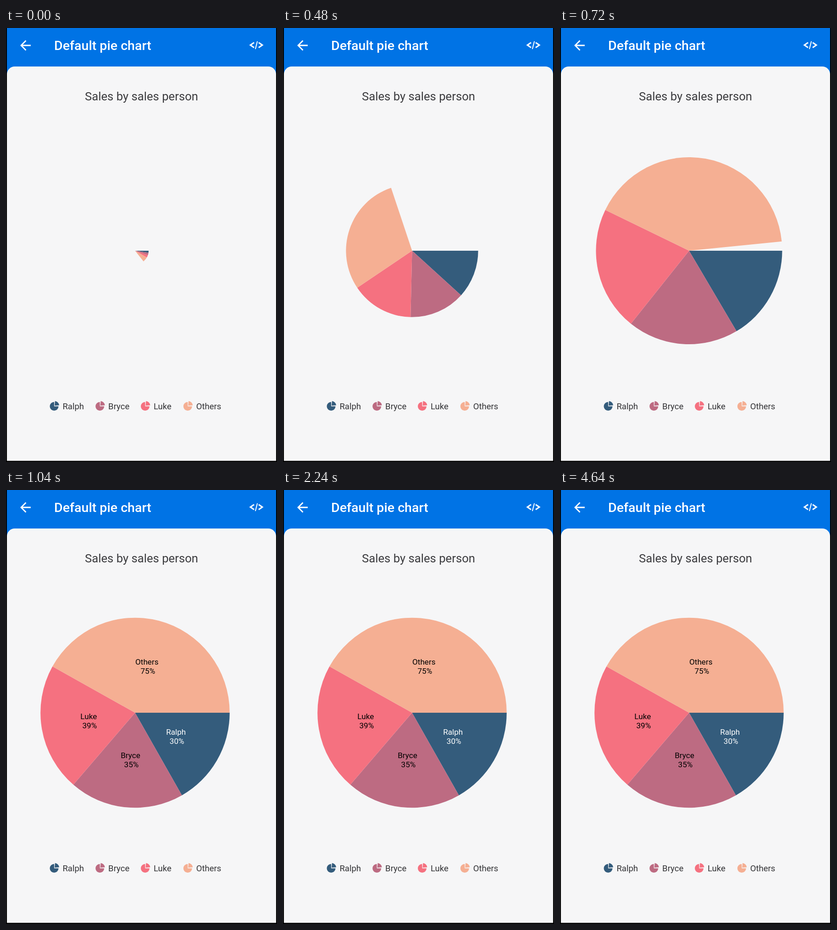
An HTML page that plays this animation: 591 by 947 pixels, repeating every 4800 ms.

```html
<!DOCTYPE html>
<html lang="en">
<head>
<meta charset="utf-8">
<title>Default pie chart</title>
<style>
html, body { margin: 0; width: 100%; height: 100%; overflow: hidden; background: #000; }
svg { display: block; width: 591px; height: 947px; font-family: Roboto, sans-serif; }
</style>
</head>
<body>
<svg viewBox="0 0 591 947">
  <rect width="591" height="947" fill="#000"/>
  <rect x="2" width="587" height="120" fill="#0073e5"/>
  <path d="M2 944.5V101a17 17 0 0 1 17-17H572a17 17 0 0 1 17 17V944.5Z" fill="#f6f6f7"/>
  <path transform="translate(25.3 20.8) scale(1.43)" fill="#fff"
    d="M20 11H7.83l5.59-5.59L12 4l-8 8 8 8 1.41-1.41L7.83 13H20v-2z"/>
  <text x="105" y="48" font-size="28.56" font-weight="500" fill="#fff">Default pie chart</text>
  <g fill="none" stroke="#fff">
    <path d="M541 31.8L533 37.3L541 42.8M551 31.8L559 37.3L551 42.8" stroke-width="3"/>
    <path d="M548.2 29L543.8 46" stroke-width="2"/>
  </g>
  <text x="295.5" y="158" font-size="25.7" text-anchor="middle" fill="#3c3c3f">Sales by sales person</text>
  <g id="pie" transform="translate(281.5 486) scale(1 1.005)"></g>
  <g id="labels" font-size="17.14" text-anchor="middle"></g>
  <g id="legend" font-size="18.56"></g>
</svg>
<script>
const LOOP = 4800, STEP = 80, RADIUS = 206.3;
const people = [
  { name: 'Ralph', value: 30, color: '#345c7c', ink: '#fff', label: [370.7, 533.5], legend: 105 },
  { name: 'Bryce', value: 35, color: '#bd6b82', ink: '#000', label: [271.5, 585], legend: 204.7 },
  { name: 'Luke', value: 39, color: '#f57180', ink: '#000', label: [180.3, 499.5], legend: 303.5 },
  { name: 'Others', value: 75, color: '#f5af93', ink: '#000', label: [307.3, 381], legend: 396.3 }
];
const total = people.reduce((sum, p) => sum + p.value, 0);
const $ = id => document.getElementById(id);
const clamp = v => Math.min(1, Math.max(0, v));

function add(parent, tag, attrs, text = '') {
  const el = document.createElementNS('http://www.w3.org/2000/svg', tag);
  for (const key in attrs) el.setAttribute(key, attrs[key]);
  el.textContent = text;
  return parent.appendChild(el);
}

// Angles in degrees, clockwise from three o'clock
function sector(x, y, r, from, to) {
  const at = deg => {
    const a = deg * Math.PI / 180;
    return `${(x + r * Math.cos(a)).toFixed(2)} ${(y + r * Math.sin(a)).toFixed(2)}`;
  };
  return `M${x} ${y}L${at(from)}A${r} ${r} 0 ${to - from > 180 ? 1 : 0} 1 ${at(to)}Z`;
}

for (const p of people) {
  p.slice = add($('pie'), 'path', { fill: p.color });
  const [x, y] = p.label;
  add($('labels'), 'text', { x, y, fill: p.ink }, p.name);
  add($('labels'), 'text', { x: x + 2, y: y + 20, fill: p.ink }, p.value + '%');
  const icon = sector(p.legend, 825.5, 9.5, 0, 270) + sector(p.legend + 1, 824, 10, -85, -5);
  add($('legend'), 'path', { d: icon, fill: p.color });
  add($('legend'), 'text', { x: p.legend + 18.4, y: 832, fill: '#333336' }, p.name);
}

function growth(t) {
  return t < 320 ? 0.143 + 0.365 * t / 320 : clamp(0.508 + 0.381 * (t - 320) / 320);
}

function draw(t) {
  const f = growth(t);
  let start = 0;
  for (const p of people) {
    const end = start + 360 * f * p.value / total;
    p.slice.setAttribute('d', sector(0, 0, RADIUS * f, start, end));
    start = end;
  }
  $('labels').setAttribute('opacity', clamp((t - 735) / 245));
}

const begin = performance.now();
function tick() {
  const t = (performance.now() - begin) % LOOP;
  draw(Math.floor((t + 4) / STEP) * STEP % LOOP);
  requestAnimationFrame(tick);
}
tick();
</script>
</body>
</html>
```
